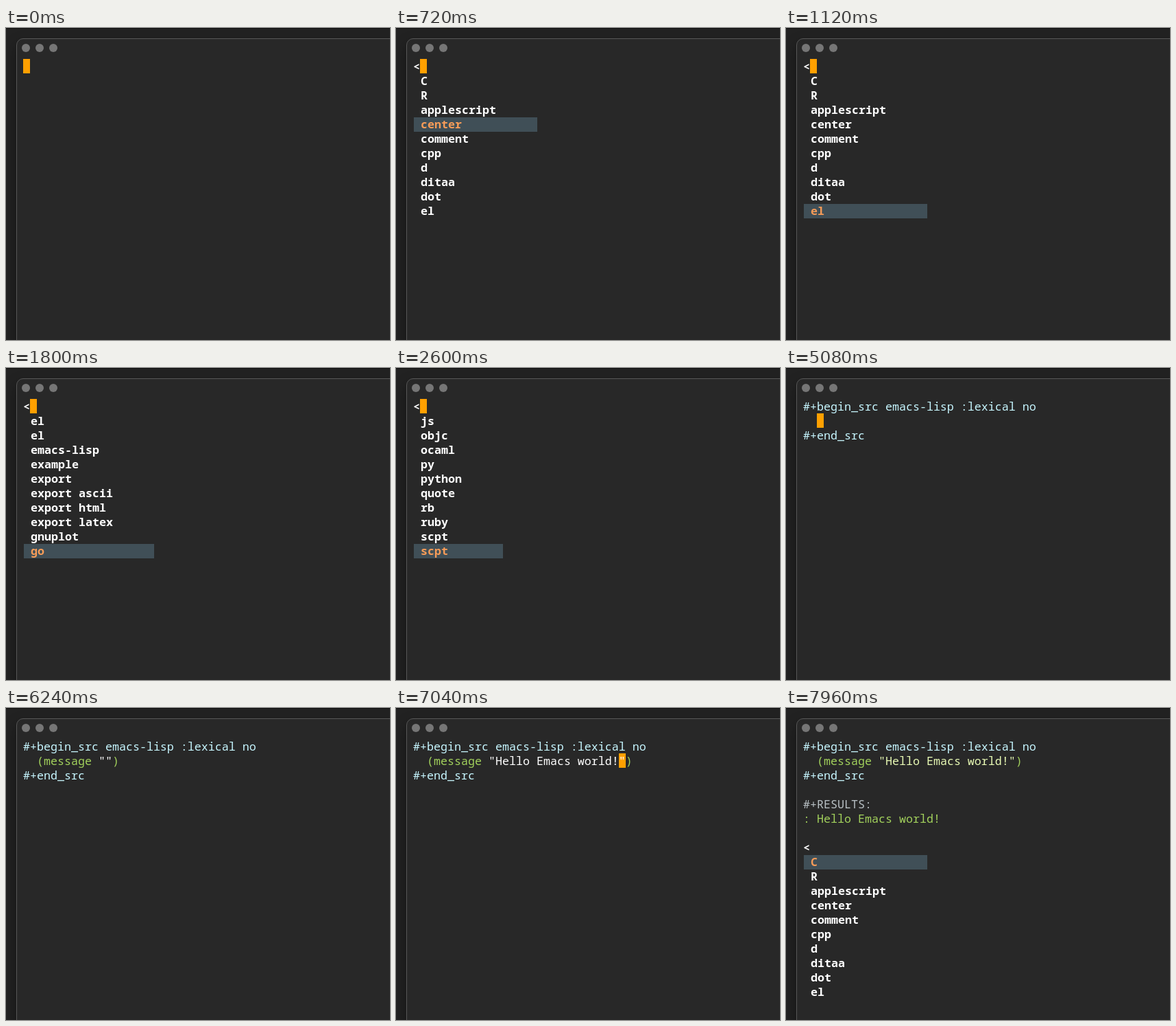
Animation, 560 px wide and 454 px high, one loop 8000 ms. Source, as an HTML page:

```html
<!DOCTYPE html>
<html lang="en">
<head>
<meta charset="utf-8">
<title>Editor completion</title>
<style>
  html, body { margin: 0; width: 100%; height: 100%; overflow: hidden; background: #222; }
  #stage { position: relative; width: 560px; height: 454px; overflow: hidden; background: linear-gradient(#0f0f0f 1px, #222 1px); }
  #window {
    position: absolute; left: 15px; top: 15px; width: 600px; height: 500px; box-sizing: border-box;
    border: 1px solid #585858; border-radius: 10px; background: #282828;
    box-shadow: 0 8px 18px rgba(0, 0, 0, .4);
  }
  .light { position: absolute; top: 23px; width: 12px; height: 12px; border-radius: 50%; background: #767676; }
  .row, .item { position: absolute; height: 21px; white-space: pre; }
  #text { font: 500 16.667px/21px "Noto Sans Mono", "DejaVu Sans Mono", monospace; font-variant-ligatures: none; color: #fff; }
  .row { left: 25px; }
  .item { left: 26px; padding-left: 10px; box-sizing: border-box; font-weight: 700; line-height: 19px; }
  .on { background: #404f57; color: #f79c58; }
  #cursor { position: absolute; width: 10px; height: 21px; background: #ffa000; }
  .meta { color: #c6f6ff; }
  .code { color: #a2d15c; }
  .str { color: #e8fab4; }
  .key { color: #b8c0c4; }
  b { font-weight: 700; }
</style>
</head>
<body>
<div id="stage">
  <div id="window"></div>
  <div class="light" style="left:23px"></div>
  <div class="light" style="left:43px"></div>
  <div class="light" style="left:63px"></div>
  <div id="cursor"></div>
  <div id="text"></div>
</div>
<script>
const LOOP = 8000, TICK = 40, CELL = 10, LINE = 21, LEFT = 25, TOP = 45, VISIBLE = 10;
const names = ('C,R,applescript,center,comment,cpp,d,ditaa,dot,el,el,emacs-lisp,example,export,' +
  'export ascii,export html,export latex,gnuplot,go,haskell,hs,java,js,objc,ocaml,py,python,' +
  'quote,rb,ruby,scpt,scpt,sh,shell,sql,sqlite,src,swift,verse').split(',');
const hello = 'Hello Emacs world!';
const code = '(message "' + hello;

// [time, count] knots
const scrolling = [[480, 0], [1120, 9], [1800, 18], [2080, 23], [2600, 31], [3040, 38]];
const typing = [[5750, 0], [6240, 10], [6960, code.length]];

// [time, row, column, visible]
const cursorKeys = [
  [0, 0, 0, 1], [120, 0, 1, 1], [480, 0, 1, 0], [560, 0, 1, 1], [3320, 0, 1, 0],
  [3480, 0, 2, 1], [3560, 0, 3, 1], [3640, 0, 4, 1], [3880, 0, 4, 0], [4200, 0, 4, 1],
  [4480, 0, 4, 0], [4800, 0, 4, 1], [5080, 1, 2, 1], [5520, 1, 2, 0], [7000, 1, 30, 1],
  [7400, 6, 0, 1], [7480, 7, 0, 1], [7600, 7, 1, 1], [7960, 7, 1, 0]
];

const textBox = document.getElementById('text');
const cursor = document.getElementById('cursor');

function countAt(knots, t) {
  if (t <= knots[0][0]) return knots[0][1];
  for (let i = 1; i < knots.length; i++) {
    const [t0, a] = knots[i - 1], [t1, b] = knots[i];
    if (t < t1) return Math.floor(a + (b - a) * (t - t0) / (t1 - t0) + 1e-6);
  }
  return knots[knots.length - 1][1];
}

const span = (kind, s) => `<span class="${kind}">${s}</span>`;
const row = (n, html) => `<div class="row" style="top:${TOP + n * LINE}px">${html}</div>`;

function popup(line, list, selected, extra) {
  const width = (Math.max(...list.map(s => s.length)) + extra) * CELL;
  return list.map((s, i) => {
    const y = TOP + 1 + (line + 1 + i) * LINE;
    return `<div class="item${i === selected ? ' on' : ''}" style="top:${y}px;width:${width}px">${s}</div>`;
  }).join('');
}

function fullList(line, selected) {
  const first = Math.max(0, selected - VISIBLE + 1);
  return popup(line, names.slice(first, first + VISIBLE), selected - first, 7);
}

function codeLine(t) {
  const n = countAt(typing, t);
  if (!n) return '';
  const quote = code.indexOf('"');
  const head = code.slice(0, Math.min(n, quote));
  const tail = n > quote ? code.slice(quote, n) + '"' : '';
  const string = t >= 7480 ? span('str', tail) : tail;
  return '  ' + span('code', head) + string + span('code', ')');
}

function prompt(t) {
  if (t < 120) return '';
  if (t < 3480) return row(0, '<b>&lt;</b>') + (t >= 240 ? fullList(0, countAt(scrolling, t)) : '');
  const typed = t < 3560 ? 'e' : t < 3640 ? 'em' : 'ema';
  return row(0, '&lt;' + typed) + (t >= 3680 ? popup(0, ['emacs-lisp'], 0, 5) : '');
}

function block(t) {
  let html = row(0, span('meta', '#+begin_src emacs-lisp :lexical no')) +
    row(1, codeLine(t)) + row(2, span('meta', '#+end_src'));
  if (t >= 7200) html += row(4, span('key', '#+RESULTS:')) + row(5, span('code', ': ' + hello));
  if (t >= 7600) html += row(7, '<b>&lt;</b>');
  if (t >= 7720) html += fullList(7, 0);
  return html;
}

let shown = '';
function draw(now) {
  const t = Math.floor((now % LOOP) / TICK + 1e-6) * TICK;
  const html = t < 5080 ? prompt(t) : block(t);
  if (html !== shown) textBox.innerHTML = shown = html;
  const [, line, col, visible] = cursorKeys.filter(k => k[0] <= t).pop();
  cursor.style.left = LEFT + col * CELL + 'px';
  cursor.style.top = TOP + line * LINE + 'px';
  cursor.style.visibility = visible ? 'visible' : 'hidden';
}

let start = null;
function frame(now) {
  if (start === null) start = now;
  draw(Math.max(0, now - start));
  requestAnimationFrame(frame);
}
draw(0);
requestAnimationFrame(frame);
</script>
</body>
</html>
```
